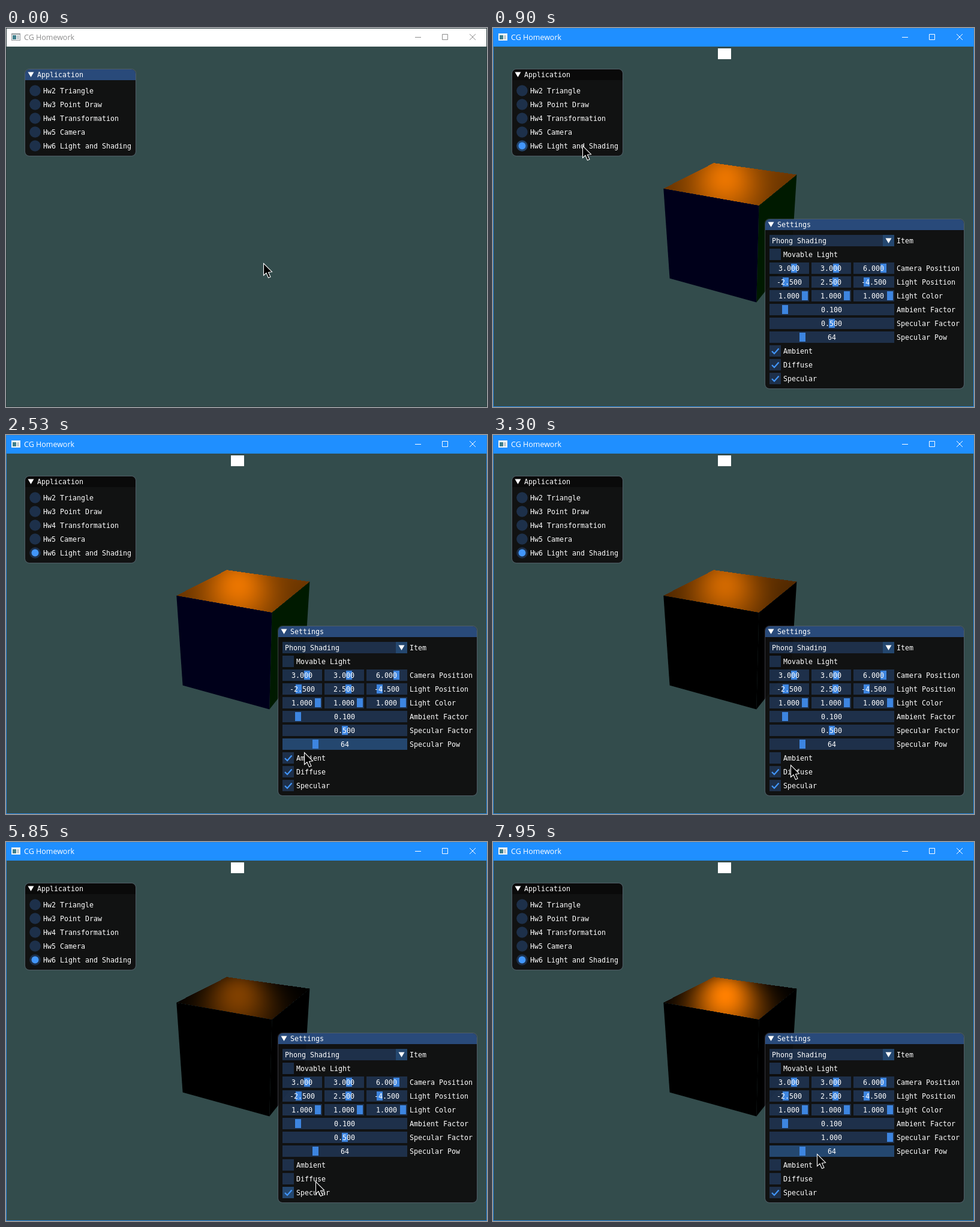
Recreate the animation shown at these times as an HTML page with a canvas. Size 802x632 px, loop 8000 ms.

```html
<!DOCTYPE html>
<html lang="en">
<head>
<meta charset="utf-8">
<title>CG Homework</title>
<style>
  html, body { margin: 0; width: 100%; height: 100%; overflow: hidden; background: #334c4c; }
  canvas { display: block; }
</style>
</head>
<body>
<canvas id="stage" width="802" height="632"></canvas>
<script>
const ctx = document.getElementById('stage').getContext('2d');
const LOOP = 8000, STEP = 77.18;
const MONO = '11.63px "DejaVu Sans Mono", "Liberation Mono", monospace';
const FRAME = 'rgba(41,74,122,.54)', HOVER = 'rgba(66,150,250,.4)', ACTIVE = 'rgba(66,150,250,.67)';
const ACCENT = '#4296fa', GRAB = '#3d85e0';

// Pointer path: [step, x, y, eased]
const PATH = [
  [0, 429, 392], [9, 149, 196, true], [14, 149, 196], [23, 531, 382, true], [24, 531, 382],
  [25, 528, 382], [27, 528, 382], [33, 497, 529], [38, 495, 547], [42, 495, 547],
  [47, 500, 561], [48, 500, 561], [49, 500, 562], [55, 500, 562], [56, 500, 564],
  [60, 498, 584], [75, 498, 584], [76, 516, 566], [85, 571, 499], [86, 571, 499],
  [87, 570, 499], [88, 570, 499], [92, 622, 499], [98, 696, 499], [100, 696, 499], [103, 540, 520]
];
const PRESSES = [[10, 12], [39, 40], [51, 52], [62, 64], [71, 72], [89, 99]];
const INPUT_LAG = 0.61;

function pointerAt(step) {
  const i = PATH.findIndex(key => key[0] >= step);
  if (i < 0) return PATH[PATH.length - 1].slice(1, 3);
  if (i === 0) return PATH[0].slice(1, 3);
  const [s0, x0, y0] = PATH[i - 1], [s1, x1, y1, eased] = PATH[i];
  let k = (step - s0) / (s1 - s0);
  if (eased) k = k * k * (3 - 2 * k);
  return [x0 + (x1 - x0) * k, y0 + (y1 - y0) * k];
}

// ---- 3D scene -------------------------------------------------------------
const dot = (a, b) => a[0] * b[0] + a[1] * b[1] + a[2] * b[2];
const sub = (a, b) => a.map((v, i) => v - b[i]);
const unit = a => a.map(v => v / Math.hypot(...a));
const cross = (a, b) => [a[1] * b[2] - a[2] * b[1], a[2] * b[0] - a[0] * b[2], a[0] * b[1] - a[1] * b[0]];

const EYE = [3, 3, 6], LIGHT = [-2.5, 2.5, -4.5], H = 0.8;
const FOCAL = 725, CX = 400.5, CY = 331;
const forward = unit(EYE.map(v => -v));
const right = unit(cross(forward, [0, 1, 0]));
const up = cross(right, forward);

function project(p) {
  const d = sub(p, EYE), depth = dot(d, forward);
  return [CX + FOCAL * dot(d, right) / depth, CY - FOCAL * dot(d, up) / depth];
}

const TOP = { x: 283, y: 223, w: 226, h: 76 };
const topFace = document.createElement('canvas');
topFace.width = TOP.w;
topFace.height = TOP.h;
const topCtx = topFace.getContext('2d');
let shadedKey = '';

// Phong shading of the top face, one ray per pixel
function shadeTop(ambient, diffuse, specular) {
  const key = [ambient, diffuse, specular].join();
  if (key === shadedKey) return;
  shadedKey = key;
  const img = topCtx.createImageData(TOP.w, TOP.h);
  for (let j = 0; j < TOP.h; j++) for (let i = 0; i < TOP.w; i++) {
    const a = (TOP.x + i + .5 - CX) / FOCAL, b = (CY - TOP.y - j - .5) / FOCAL;
    const ray = forward.map((f, n) => f + right[n] * a + up[n] * b);
    const t = (H - EYE[1]) / ray[1];
    const p = EYE.map((e, n) => e + ray[n] * t);
    if (Math.abs(p[0]) > H || Math.abs(p[2]) > H) continue;
    const l = unit(sub(LIGHT, p)), v = unit(sub(EYE, p));
    const shine = Math.max(0, dot([-l[0], l[1], -l[2]], v)) ** 64;
    const level = 255 * Math.min(1, ambient + diffuse * l[1] + specular * shine);
    img.data.set([level, level / 2, 0, 255], (j * TOP.w + i) * 4);
  }
  topCtx.putImageData(img, 0, 0);
}

function polygon(points, fill) {
  ctx.beginPath();
  points.forEach(([x, y]) => ctx.lineTo(x, y));
  ctx.closePath();
  ctx.fillStyle = fill;
  ctx.fill();
}

function drawCube(ambient, diffuse, specular) {
  const face = (corners, fill) => polygon(corners.map(c => project(c.map(v => v * H))), fill);
  const dark = Math.round(255 * ambient);
  face([[1, 1, 1], [1, 1, -1], [1, -1, -1], [1, -1, 1]], `rgb(0,${dark},0)`);
  face([[-1, 1, 1], [1, 1, 1], [1, -1, 1], [-1, -1, 1]], `rgb(0,0,${dark})`);
  shadeTop(ambient, diffuse, specular);
  ctx.drawImage(topFace, TOP.x, TOP.y);
}

// ---- Widgets --------------------------------------------------------------
let mouse, pressed;

function box(x, y, w, h, fill) {
  ctx.fillStyle = fill;
  ctx.fillRect(x, y, w, h);
}

function text(str, x, y, fill = '#fff', font = MONO) {
  ctx.font = font;
  ctx.fillStyle = fill;
  ctx.fillText(str, x, y);
}

function circle(x, y, r, fill) {
  ctx.beginPath();
  ctx.arc(x, y, r, 0, 7);
  ctx.fillStyle = fill;
  ctx.fill();
}

const arrow = (x, y) => polygon([[x - 5, y - 4], [x + 5, y - 4], [x, y + 4.5]], '#fff');

const isOver = (x, y, w, h) => mouse[0] >= x && mouse[0] < x + w && mouse[1] >= y && mouse[1] < y + h;

function frameColor(x, y, w, h) {
  return isOver(x, y, w, h) ? (pressed ? ACTIVE : HOVER) : FRAME;
}

function panel(title, x, y, w, h, focused) {
  const outline = () => { ctx.beginPath(); ctx.roundRect(x, y, w, h, 7); };
  outline();
  ctx.fillStyle = 'rgba(15,15,15,.94)';
  ctx.fill();
  ctx.beginPath();
  ctx.roundRect(x, y, w, 18, [7, 7, 0, 0]);
  ctx.fillStyle = focused ? '#294a7a' : '#0a0a0a';
  ctx.fill();
  ctx.beginPath();
  ctx.roundRect(x - .5, y - .5, w + 1, h + 1, 7);
  ctx.strokeStyle = 'rgba(110,110,128,.5)';
  ctx.lineWidth = 1;
  ctx.stroke();
  arrow(x + 9.5, y + 8.5);
  text(title, x + 20, y + 13);
}

function radio(label, y, on) {
  circle(48.5, y + 9.5, 9.3, frameColor(39, y, 23 + label.length * 7, 19));
  if (on) circle(48.5, y + 9.5, 6, ACCENT);
  text(label, 62, y + 14);
}

function checkbox(label, y, on) {
  box(461, y, 19, 19, frameColor(461, y, 23 + label.length * 7, 19));
  if (on) {
    ctx.beginPath();
    [[465, 10], [469, 14], [476.5, 5.5]].forEach(([x, dy]) => ctx.lineTo(x, y + dy));
    ctx.strokeStyle = ACCENT;
    ctx.lineWidth = 2.2;
    ctx.stroke();
  }
  text(label, 484, y + 14);
}

function slider(x, y, w, ratio, value, dragging = false) {
  box(x, y, w, 19, dragging ? ACTIVE : frameColor(x, y, w, 19));
  box(Math.round(x + 2 + ratio * (w - 14)), y + 2, 10, 15, dragging ? ACCENT : GRAB);
  text(value, Math.floor(x + w / 2 - value.length * 3.5), y + 14);
}

function tripleSlider(label, y, values, min, max) {
  values.forEach((v, i) => slider(461 + 70 * i, y, i < 2 ? 66 : 68, (v - min) / (max - min), v.toFixed(3)));
  text(label, 673, y + 14);
}

function wideSlider(label, y, ratio, value, dragging) {
  slider(461, y, 208, ratio, value, dragging);
  text(label, 673, y + 14);
}

function drawSettings(s) {
  panel('Settings', 454, 319, 331, 282, true);
  const overCombo = isOver(461, 345, 208, 19);
  box(461, 345, 189, 19, overCombo ? HOVER : FRAME);
  box(650, 345, 19, 19, overCombo ? ACCENT : HOVER);
  arrow(659.5, 354.5);
  text('Phong Shading', 465, 359);
  text('Item', 673, 359);
  checkbox('Movable Light', 368, false);
  tripleSlider('Camera Position', 391, EYE, -10, 10);
  tripleSlider('Light Position', 414, LIGHT, -10, 10);
  tripleSlider('Light Color', 437, [1, 1, 1], 0, 1);
  wideSlider('Ambient Factor', 460, .1, '0.100');
  wideSlider('Specular Factor', 483, s.factor, s.factor.toFixed(3), s.dragging);
  wideSlider('Specular Pow', 506, 63 / 255, '64');
  checkbox('Ambient', 529, s.ambient);
  checkbox('Diffuse', 552, s.diffuse);
  checkbox('Specular', 575, s.specular);
}

function drawWindow(active) {
  const ink = active ? '#fff' : '#8c8c8c', edge = active ? '#2a86e0' : '#2b3c3e';
  box(0, 0, 802, 632, edge);
  box(1, 31, 800, 600, '#334c4c');
  box(1, 1, 800, 30, active ? '#1f8fff' : '#fff');
  box(9, 9, 15, 12, active ? '#e8eef2' : '#8f9699');
  box(10, 11, 13, 9, '#fff');
  box(11, 12, 6, 7, '#3f7f8c');
  box(18, 12, 4, 7, '#c3ccd0');
  text('CG Homework', 30, 20, ink, '12.5px "Open Sans", "Noto Sans", sans-serif');
  ctx.strokeStyle = ink;
  ctx.lineWidth = 1;
  ctx.beginPath();
  ctx.moveTo(682, 15.5); ctx.lineTo(692, 15.5);
  ctx.rect(727.5, 10.5, 9, 9);
  ctx.moveTo(773, 10); ctx.lineTo(783, 20);
  ctx.moveTo(783, 10); ctx.lineTo(773, 20);
  ctx.stroke();
}

function drawCursor(x, y) {
  const shape = [[0, 0], [0, 20], [4.5, 16], [8, 24], [11.5, 22.5], [8, 15], [14, 14.2]];
  polygon(shape.map(([dx, dy]) => [x + dx + .5, y + dy + .5]), '#000');
  ctx.strokeStyle = '#fff';
  ctx.lineWidth = 1.1;
  ctx.stroke();
}

function draw(t) {
  const step = t < 70 ? 0 : Math.floor((t + 28) / STEP);
  const [x, y] = pointerAt(step).map(Math.round);
  mouse = pointerAt(Math.max(0, step - INPUT_LAG));
  pressed = PRESSES.some(([from, to]) => step >= from && step < to);
  const open = step >= 12;
  const s = {
    ambient: step < 40,
    diffuse: step < 52,
    specular: step < 64 || step >= 72,
    dragging: step >= 89 && step < 99,
    factor: step < 89 ? .5 : step >= 99 ? 1 : Math.min(1, (mouse[0] - 468) / 194)
  };

  drawWindow(step >= 10);
  if (open) {
    box(375, 34, 22, 18, '#fff');
    drawCube(s.ambient ? .1 : 0, s.diffuse ? 1 : 0, s.specular ? s.factor : 0);
  }
  panel('Application', 32, 69, 184, 144, !open);
  ['Hw2 Triangle', 'Hw3 Point Draw', 'Hw4 Transformation', 'Hw5 Camera', 'Hw6 Light and Shading']
    .forEach((label, i) => radio(label, 95 + 23 * i, open && i === 4));
  if (open) drawSettings(s);
  if (pressed) circle(x, y, 12, 'rgba(195,195,20,.8)');
  drawCursor(x, y);
}

const start = performance.now();
function tick() {
  draw((performance.now() - start) % LOOP);
  requestAnimationFrame(tick);
}
tick();
</script>
</body>
</html>
```
